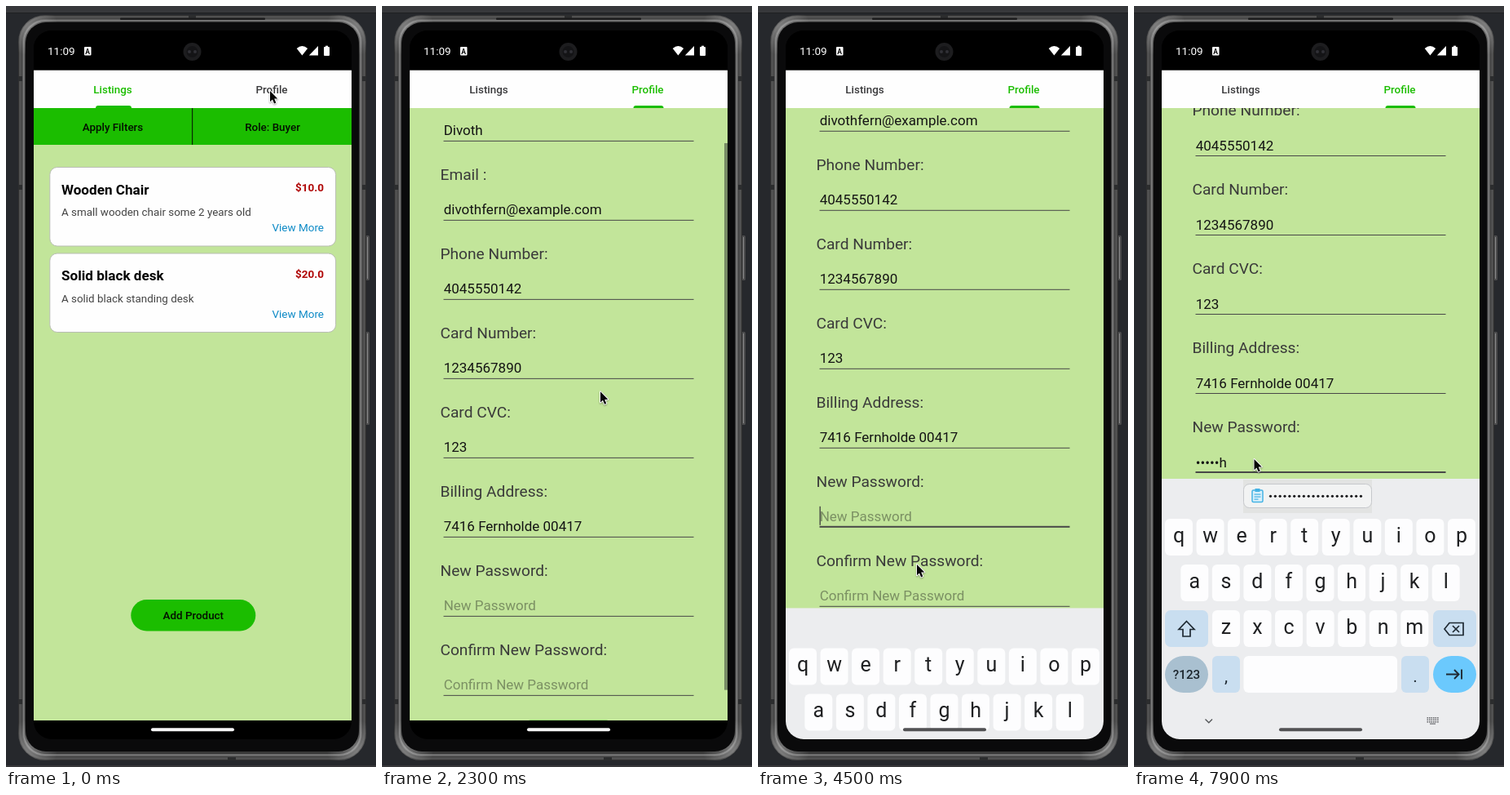
Recreate the animation shown at these times as an HTML page with a canvas. Size 454 by 932 pixels, loop 8 s.

```html
<!DOCTYPE html>
<html lang="en">
<head>
<meta charset="utf-8">
<title>Marketplace profile</title>
<style>
html, body { margin: 0; width: 100%; height: 100%; overflow: hidden; background: #26282c; }
canvas { display: block; width: 454px; height: 932px; }
</style>
</head>
<body>
<canvas id="stage"></canvas>
<script>
const W = 454, H = 932, LOOP = 8000;
const GREEN = '#1bbd00', PAGE = '#c2e59a';
const canvas = document.getElementById('stage');
const ratio = window.devicePixelRatio || 1;
canvas.width = W * ratio;
canvas.height = H * ratio;
const ctx = canvas.getContext('2d');

const FIELDS = [
  ['Name:', 'Divoth'],
  ['Email :', 'divothfern@example.com'],
  ['Phone Number:', '4045550142'],
  ['Card Number:', '1234567890'],
  ['Card CVC:', '123'],
  ['Billing Address:', '7416 Fernholde 00417'],
  ['New Password:', '', 'New Password'],
  ['Confirm New Password:', '', 'Confirm New Password']
];
const TYPED = 'divoth';
const KEY_TIMES = [6050, 6250, 6450, 6650, 6900, 7200];
const FOCUS = 4150;
const PITCH = 97;
const PIVOT = 920;

// time, x, y
const POINTER = [
  [0, 324, 104], [800, 324, 104], [1200, 276, 491], [1900, 270, 521],
  [2300, 268, 472.5], [2800, 255.5, 374], [3050, 255, 366], [3300, 240, 440],
  [3800, 197.5, 673], [4050, 195, 684], [4600, 195, 684], [5150, 151.5, 563],
  [5600, 151.5, 563], [6000, 147.5, 555], [8000, 147.5, 555]
];
const SCROLL = [[1950, 0], [2300, 48], [2600, 89.5], [4350, 89.5], [4650, 224]];
const STRETCH = [[2600, 0], [2800, 0.0092], [3000, 0.01], [3350, 0]];
const BAR = [[1950, 0], [2000, 1], [3850, 1], [4100, 0]];
const RIPPLE = [[500, 0], [600, 1], [1250, 1], [1450, 0]];

const clamp = v => Math.max(0, Math.min(1, v));
const ramp = (t, a, b) => clamp((t - a) / (b - a));
const ease = p => p * p * (3 - 2 * p);

function track(keys, t, col = 1) {
  if (t <= keys[0][0]) return keys[0][col];
  for (let i = 1; i < keys.length; i++) {
    const a = keys[i - 1], b = keys[i];
    if (t <= b[0]) return a[col] + (b[col] - a[col]) * ramp(t, a[0], b[0]);
  }
  return keys[keys.length - 1][col];
}

function rect(x, y, w, h, color) {
  ctx.fillStyle = color;
  ctx.fillRect(x, y, w, h);
}

function round(x, y, w, h, r, fill, stroke, width = 1) {
  ctx.beginPath();
  ctx.roundRect(x, y, w, h, r);
  if (fill) { ctx.fillStyle = fill; ctx.fill(); }
  if (stroke) { ctx.strokeStyle = stroke; ctx.lineWidth = width; ctx.stroke(); }
}

function disc(x, y, r, color) {
  ctx.beginPath();
  ctx.arc(x, y, r, 0, Math.PI * 2);
  ctx.fillStyle = color;
  ctx.fill();
}

function path(points, fill, stroke, width = 1.5, closed = true) {
  ctx.beginPath();
  points.forEach(([x, y]) => ctx.lineTo(x, y));
  if (closed) ctx.closePath();
  if (fill) { ctx.fillStyle = fill; ctx.fill(); }
  if (stroke) { ctx.strokeStyle = stroke; ctx.lineWidth = width; ctx.stroke(); }
}

function text(str, x, y, size, color, weight = 400, align = 'left') {
  ctx.font = `${weight} ${size}px Roboto, sans-serif`;
  ctx.textAlign = align;
  ctx.fillStyle = color;
  ctx.fillText(str, x, y);
}

function clipped(x, y, w, h, r, draw) {
  ctx.save();
  ctx.beginPath();
  ctx.roundRect(x, y, w, h, r);
  ctx.clip();
  draw();
  ctx.restore();
}

function phone() {
  rect(0, 0, W, H, '#26282c');
  rect(0, 0, W, 9, '#37383b');
  rect(0, 8, W, 1, '#1e1f22');
  rect(0, 930, W, 2, '#38383a');
  for (const [y, h] of [[281, 55], [399, 114]]) {
    round(440, y, 6, h, 1.5, '#4c4c4d');
    rect(443, y + 2, 1, h - 4, '#8a8a8a');
  }
  // metal edge, shaded from the outside in
  [48, 78, 84, 76, 70, 88, 122, 104, 56].forEach((v, i) => {
    round(15 + i, 11 + i, 427 - 2 * i, 913 - 2 * i, 33 - i, `rgb(${v},${v},${v})`);
  });
  clipped(15, 11, 427, 913, 33, () => {
    for (const x of [30, 427]) for (const y of [27, 908]) {
      const glow = ctx.createRadialGradient(x, y, 0, x, y, 34);
      glow.addColorStop(0, 'rgba(255,255,255,.3)');
      glow.addColorStop(1, 'rgba(255,255,255,0)');
      disc(x, y, 34, glow);
    }
  });
  round(24, 20, 409, 893, 25, '#0a0a0b');
  for (const y of [86, 219, 849]) {
    rect(15, y, 5, 6, '#2c2d2e');
    rect(437, y, 5, 6, '#2c2d2e');
  }
  rect(224, 11, 9, 4, '#2c2d2e');
  rect(272, 920, 10, 4, '#2c2d2e');
  round(140, 14.5, 178, 2.5, 1, '#1c1c1d');
}

function statusBar() {
  rect(34, 30, 390, 49, '#000');
  text('11:09', 51, 60, 13.5, '#fff');
  round(96, 50, 8.5, 10.5, 1, '#fff');
  text('A', 100.2, 58.5, 8.5, '#000', 700, 'center');
  disc(228.5, 56, 11, '#1d1d1f');
  disc(228.5, 56, 7, '#141416');
  disc(225, 56, 2, '#303036');
  disc(232, 56, 2, '#303036');
  ctx.beginPath();
  ctx.moveTo(363.4, 60.5);
  ctx.lineTo(356.7, 52);
  ctx.quadraticCurveTo(363.4, 45.8, 370.1, 52);
  ctx.fillStyle = '#fff';
  ctx.fill();
  path([[383, 49], [383, 60.5], [371.8, 60.5]], '#fff');
  round(390, 50, 7, 11, 1, '#fff');
  rect(392, 48.7, 3, 2, '#fff');
}

function tabs(t, p) {
  rect(34, 78.7, 390, 46.3, '#fefefe');
  const wash = track(RIPPLE, t);
  if (wash > 0) clipped(228, 79, 196, 46, 0, () => {
    ctx.globalAlpha = wash * 0.08;
    disc(326, 102, 98.5 * (0.3 + 0.7 * ease(ramp(t, 500, 800))), '#309a20');
  });
  const on = p > 0.3;
  text('Listings', 131, 107.3, 13.4, on ? '#3a3a3c' : GREEN, 500, 'center');
  text('Profile', 326, 107.3, 13.4, on ? GREEN : '#3a3a3c', 500, 'center');
  const w = 44 - 7 * p, mid = 132 + 195 * p;
  round(mid - w / 2, 122, w, 3, [3, 3, 0, 0], GREEN);
}

function card(y, title, price, note) {
  round(53.8, y, 350.8, 96.5, 9, '#fefefe', '#b9bdb4');
  text(title, 68, y + 33, 17.1, '#050505', 700);
  text(price, 390, y + 29.5, 13.5, '#b00808', 700, 'right');
  text(note, 68, y + 59.7, 13.4, '#444');
  text('View More', 390, y + 78.5, 13.5, '#0d8ac6', 400, 'right');
}

function pill(x, y, w, label) {
  round(x, y, w, 38.5, 19.25, GREEN);
  text(label, x + w / 2, y + 24.2, 13.4, '#041000', 500, 'center');
}

function listings() {
  rect(34, 125, 390, 45, GREEN);
  rect(228, 125, 1.2, 45, '#0a2a04');
  text('Apply Filters', 131, 152.8, 13.4, '#041000', 500, 'center');
  text('Role: Buyer', 327, 152.8, 13.4, '#041000', 500, 'center');
  card(197.5, 'Wooden Chair', '$10.0', 'A small wooden chair some 2 years old');
  card(303, 'Solid black desk', '$20.0', 'A solid black standing desk');
  pill(153.3, 727, 153, 'Add Product');
}

function password(t) {
  const n = KEY_TIMES.filter(k => k <= t).length;
  return n ? '•'.repeat(n - 1) + TYPED[n - 1] : '';
}

function caret(t, x, y) {
  const since = Math.max(FOCUS, ...KEY_TIMES.filter(k => k <= t));
  if ((t - since) % 1000 < 500) rect(x, y, 1.3, 23, '#3c3c3c');
}

function scrollBar(t, top) {
  const fade = track(BAR, t), view = 750, all = 840;
  if (fade <= 0) return;
  ctx.globalAlpha *= fade;
  rect(420, 125 + Math.min(top, 90) * view / all, 4, view * view / all, 'rgba(20,20,30,.43)');
}

function profile(t) {
  const k = track(STRETCH, t), top = track(SCROLL, t);
  ctx.save();
  ctx.translate(0, -PIVOT * k);
  ctx.scale(1, 1 + k);
  ctx.translate(0, -top);
  FIELDS.forEach(([label, value, hint], i) => {
    const y = i * PITCH, focused = i === 6 && t >= FOCUS;
    const shown = i === 6 ? password(t) : value;
    text(label, 71.5, 164 + y, 19.15, '#3a3a3a');
    text(shown || hint, 75.7, 206.6 + y, 17, shown ? '#141414' : '#7b9063');
    if (focused) caret(t, 75.5 + (shown ? ctx.measureText(shown).width : 0), 188 + y);
    rect(75.5, (focused ? 212 : 213) + y, 307, focused ? 2 : 1, '#484848');
  });
  pill(162.7, 923, 132, 'Update Profile');
  ctx.translate(0, top);
  scrollBar(t, top);
  ctx.restore();
}

function letters(row, x, y) {
  [...row].forEach((c, i) => {
    const left = x + i * 38.55;
    round(left, y, 34, 45, 6, '#fdfdfe');
    text(c, left + 17, y + 28.8, 25, '#1f2022', 400, 'center');
  });
}

function chip(t) {
  const dim = ramp(t, 7600, 7900);
  if (dim > 0) rect(134, 580, 158, 41, `rgba(226,227,226,${dim})`);
  round(134.5, 585.5, 157, 29, 7, dim > 0.5 ? '#f2f3f3' : '#fdfdfe', '#c6c8cc');
  round(145, 593, 13, 14.5, 1.5, '#d9f0fb', '#45b3e4', 1.5);
  rect(148.5, 591, 6, 4, '#45b3e4');
  for (let i = 0; i < 3; i++) rect(147.5, 597.5 + i * 3, i < 2 ? 8 : 5, 1.2, '#45b3e4');
  for (let i = 0; i < 20; i++) disc(167.5 + i * 5.84, 600.3, 1.6, '#1c1c1e');
}

function keyboard(t, drop) {
  const soft = '#c9def0', ink = '#1f2a33';
  ctx.save();
  ctx.translate(0, drop);
  rect(34, 579, 390, 320, '#ecedef');
  if (t > 4900) chip(t);
  letters('qwertyuiop', 38, 628);
  letters('asdfghjkl', 57.3, 684);
  letters('zxcvbnm', 96, 740);
  round(38, 740, 53, 45, 7, soft);
  path([[64.5, 753.5], [74, 763.5], [69, 763.5], [69, 772], [60, 772], [60, 763.5], [55, 763.5]], null, ink, 1.7);
  round(367, 740, 53, 45, 7, soft);
  path([[381, 763], [387, 755.5], [404, 755.5], [404, 770.5], [387, 770.5]], null, ink, 1.7);
  path([[391, 759], [399, 767]], null, ink, 1.7, false);
  path([[399, 759], [391, 767]], null, ink, 1.7, false);
  round(38, 796, 53, 45, 22.5, '#a9c0d0');
  text('?123', 64.5, 823.7, 15.2, '#1c252c', 500, 'center');
  round(96, 796, 34, 45, 6, soft);
  text(',', 113, 828, 21, ink, 400, 'center');
  round(134.5, 796, 188.5, 45, 6, '#fdfdfe');
  round(328, 796, 34, 45, 6, soft);
  text('.', 345, 828, 21, ink, 400, 'center');
  round(367, 796, 53, 45, 22.5, '#6bc9fd');
  path([[383, 818.5], [398, 818.5]], null, ink, 1.9, false);
  path([[393, 813], [398.5, 818.5], [393, 824]], null, ink, 1.9, false);
  path([[402, 812.5], [402, 824.5]], null, ink, 1.9, false);
  path([[87.5, 873.5], [91.8, 877.7], [96, 873.5]], null, '#56585b', 1.4, false);
  for (let r = 0; r < 3; r++)
    for (let c = 0; c < 6; c++) rect(359.5 + c * 2.5, 871 + r * 2.5, 1.6, 1.6, '#6b6d70');
  rect(363, 878.5, 7, 1.2, '#6b6d70');
  ctx.restore();
}

function pointer(x, y) {
  ctx.save();
  ctx.translate(x, y);
  ctx.lineJoin = 'round';
  ctx.shadowColor = 'rgba(0,0,0,.35)';
  ctx.shadowBlur = 2 * ratio;
  ctx.shadowOffsetY = ratio;
  const arrow = [[0, 0], [0, 13.2], [3, 10.4], [5.1, 15.4], [7.3, 14.4], [5.2, 9.6], [9.3, 9.4]];
  path(arrow, null, '#fff', 1.9);
  ctx.shadowColor = 'transparent';
  path(arrow, '#050505');
  ctx.restore();
}

function draw(t) {
  ctx.setTransform(ratio, 0, 0, ratio, 0, 0);
  phone();
  const p = ease(ramp(t, 600, 880));
  const rise = ease(ramp(t, 4350, 4650));
  const drop = 320 * (1 - rise);
  clipped(34, 30, 390, 868, 22, () => {
    rect(34, 30, 390, 868, '#000');
    statusBar();
    rect(34, 125, 390, 750, PAGE);
    clipped(34, 125, 390, Math.min(875, 579 + drop) - 125, 0, () => {
      if (p < 1) { ctx.globalAlpha = 1 - p; listings(); }
      if (p > 0) { ctx.globalAlpha = p; profile(t); }
    });
    tabs(t, p);
    if (rise > 0) keyboard(t, drop);
    round(178, 884.3, 102, 4, 2, rise > 0.3 ? '#525254' : '#f6f6f6');
  });
  pointer(track(POINTER, t, 1), track(POINTER, t, 2));
}

const start = performance.now();
function tick() {
  draw((performance.now() - start) % LOOP);
  requestAnimationFrame(tick);
}
tick();
</script>
</body>
</html>
```
